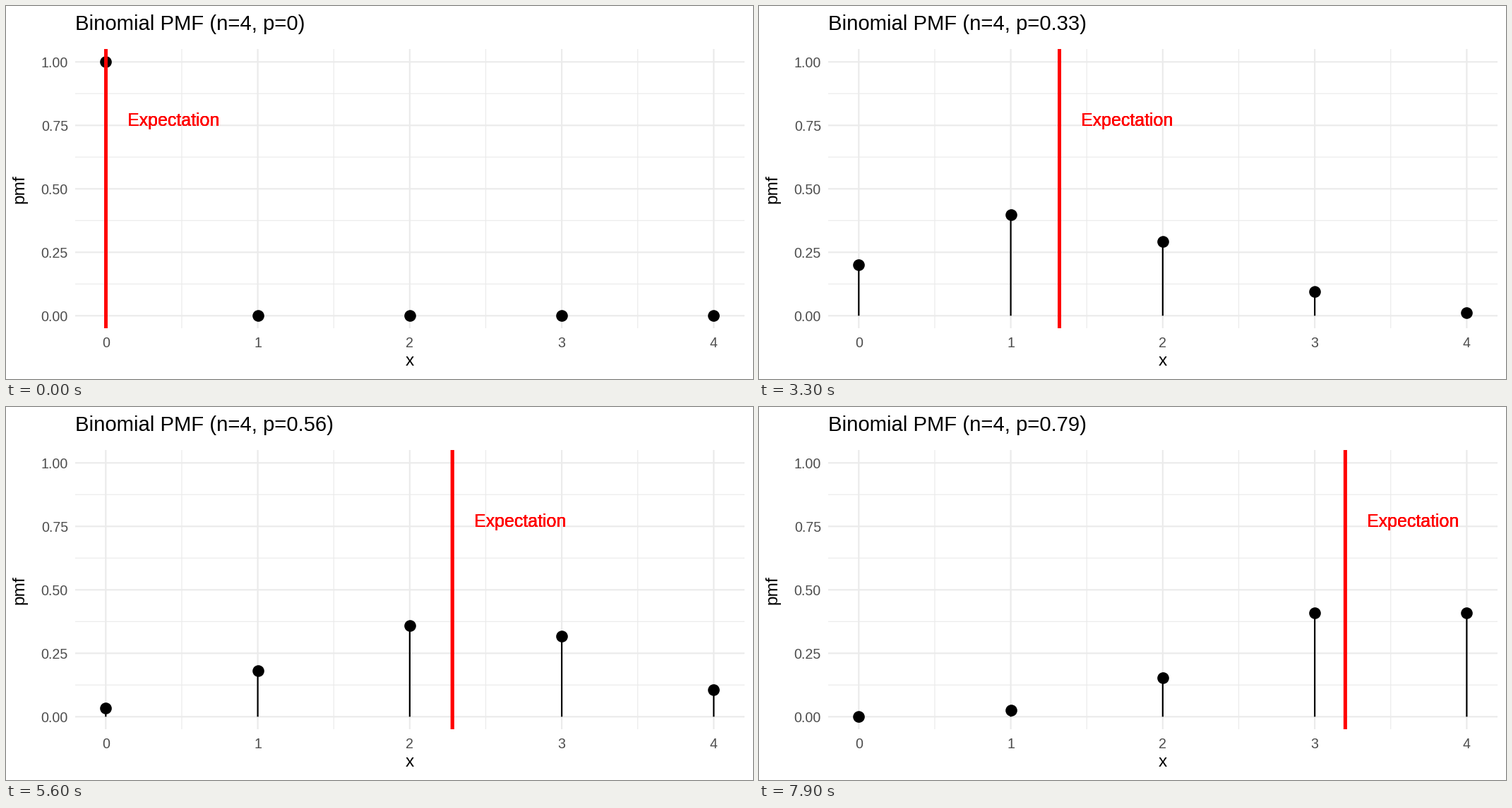
These frames come from a looping animation (1058x529 px, 8 s). A matplotlib script:

```python
from math import comb

import matplotlib.pyplot as plt
from matplotlib.animation import FuncAnimation

W, H, DPI = 1058, 529, 92
FRAMES, INTERVAL = 80, 100
N = 4
LEFT, RIGHT, TOP, BOTTOM = 98, 1046, 61, 457
OVERDRAW = 5  # label and mean line are painted once per outcome

plt.rcParams["font.family"] = "Liberation Sans"
fig = plt.figure(figsize=(W / DPI, H / DPI), dpi=DPI, facecolor="white")
ax = fig.add_axes([0, 0, 1, 1])
ax.set_xlim(0, W)
ax.set_ylim(H, 0)
ax.axis("off")


def pt(px):
    return px * 72 / DPI


def sx(x):
    return 141.3 + 215.27 * x


def sy(y):
    return 439.3 - 360 * y


def line(xs, ys, color, width, z):
    return ax.plot(xs, ys, color=color, lw=pt(width), zorder=z,
                   solid_capstyle="butt", snap=False)[0]


def label(x, y, text, size, color="black", **kw):
    kw = {"ha": "left", "va": "baseline", **kw}
    return ax.text(x, y, text, fontsize=pt(size), color=color, zorder=6, **kw)


def grid(xs, ys, width, z):
    for y in ys:
        line([LEFT, RIGHT], [sy(y)] * 2, "#EBEBEB", width, z)
    for x in xs:
        line([sx(x)] * 2, [TOP, BOTTOM], "#EBEBEB", width, z)


grid([k + 0.5 for k in range(N)], [k / 4 + 0.125 for k in range(4)], 1.2, 1)
grid(range(N + 1), [k / 4 for k in range(5)], 2.2, 2)

for k in range(5):
    label(88, sy(k / 4) + 7.3, f"{k / 4:.2f}", 19.6, "#4D4D4D", ha="right")
    label(sx(k), 483.5, str(k), 19.6, "#4D4D4D", ha="center")
label(571.8, 509.5, "x", 24.4, ha="center")
label(30, 259.3, "pmf", 24.4, rotation=90, ha="right", va="center")
title = label(97.5, 34, "", 29.3)

stems = [line([sx(k)] * 2, [sy(0)] * 2, "black", 2.2, 3) for k in range(N + 1)]
dots = ax.plot([], [], "o", color="black", ms=pt(16.6), mew=0, zorder=4,
               snap=False)[0]
means = [line([0, 0], [TOP, BOTTOM], "red", 4.4, 5) for _ in range(OVERDRAW)]
notes = [label(0, 169.8, "Expectation", 25, "red") for _ in range(OVERDRAW)]


def pmf(k, p):
    return comb(N, k) * p**k * (1 - p)**(N - k)


def draw(i):
    # 101 probabilities spread over 100 steps, so one value is skipped
    p = round(i * 100 / 99) / 100
    title.set_text(f"Binomial PMF (n={N}, p={i / 100:g})")
    tops = [sy(pmf(k, p)) for k in range(N + 1)]
    for stem, top in zip(stems, tops):
        stem.set_ydata([sy(0), top])
    dots.set_data([sx(k) for k in range(N + 1)], tops)
    x = sx(N * p)
    for mean, note in zip(means, notes):
        mean.set_xdata([x, x])
        note.set_x(x + 30.5)
    return [title, dots, *stems, *means, *notes]


anim = FuncAnimation(fig, draw, frames=FRAMES, interval=INTERVAL,
                     init_func=lambda: draw(0), repeat=True, repeat_delay=0,
                     blit=False)
plt.show()
```
